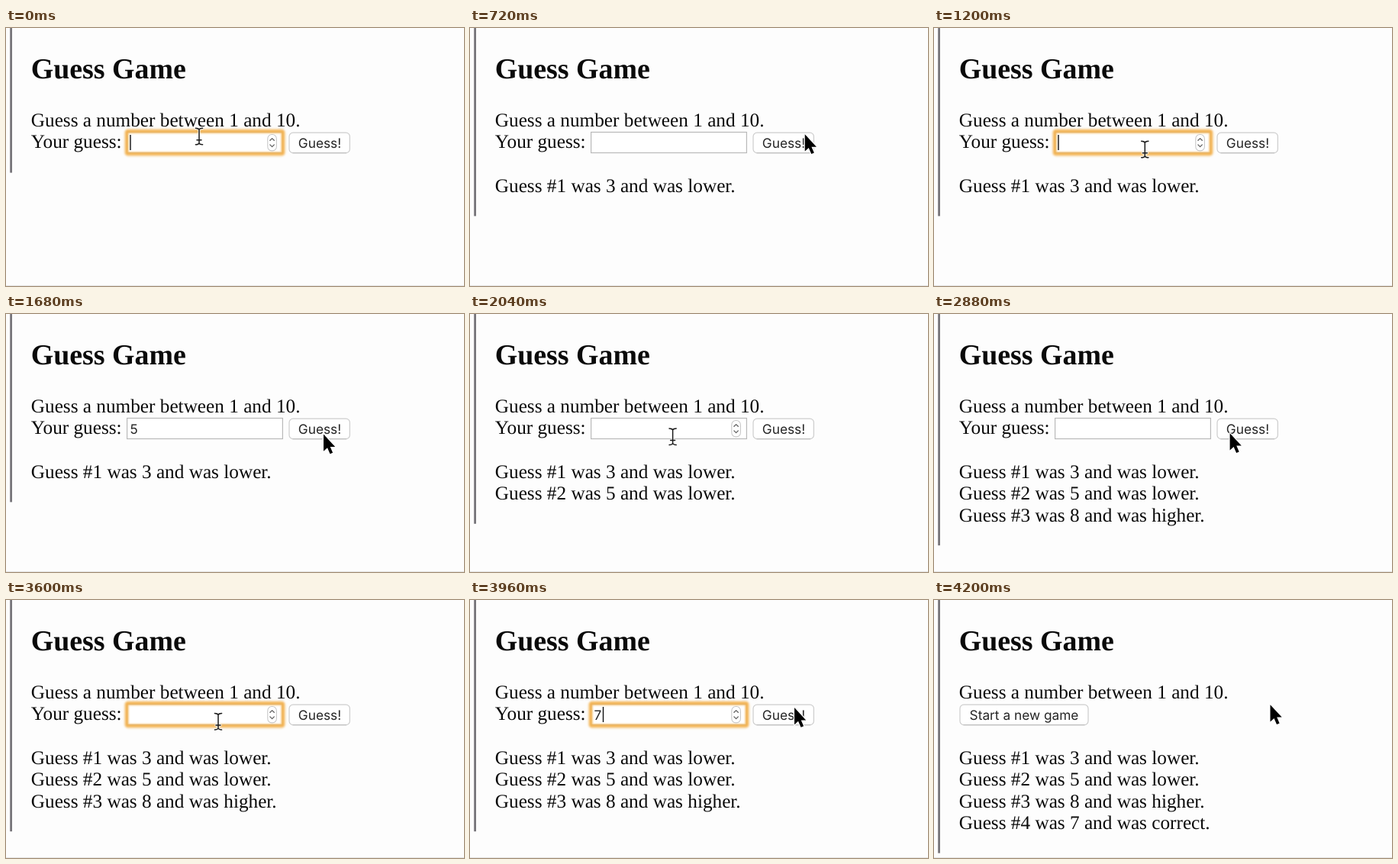
These frames come from a looping animation (600 px wide and 338 px high, 4.44 s). An HTML page:

```html
<!DOCTYPE html>
<html lang="en">
<head>
<meta charset="utf-8">
<title>Guess Game</title>
<style>
  html, body { margin: 0; width: 100%; height: 100%; overflow: hidden; background: #fdfdfd; }
  svg { display: block; width: 100vw; height: 100vh; }
  text { font: 25.25px "Liberation Serif", "Times New Roman", serif; fill: #0a0a0a; text-rendering: geometricPrecision; }
  .title { font-size: 37.9px; font-weight: bold; }
  .ui { font: 17.3px Inter, Roboto, sans-serif; fill: #262626; }
  .mid { text-anchor: middle; }
  .button rect { fill: #fff; stroke: #cdcdcd; stroke-width: 1.2; }
  .button path { fill: none; stroke: #bababa; stroke-width: 1.1; }
  .line { fill: none; stroke-linecap: round; stroke-linejoin: round; }
</style>
</head>
<body>
<svg viewBox="0 0 600 338" preserveAspectRatio="none">
  <defs>
    <filter id="soft" x="-5%" y="-25%" width="110%" height="150%"><feGaussianBlur stdDeviation="1"/></filter>
    <path id="beamShape" d="M-4.6 -10.8 Q-1 -10.8 0 -8.8 Q1 -10.8 4.6 -10.8 M0 -8.8 V8.8 M-4.6 10.8 Q-1 10.8 0 8.8 Q1 10.8 4.6 10.8 M-3 4.8 H3"/>
  </defs>
  <rect width="600" height="338" fill="#fdfdfd"/>
  <rect y="337" width="600" height="1" fill="#e6e6e6"/>
  <rect id="bar" x="5.2" width="2.8" fill="#77757a"/>

  <text class="title" x="32.7" y="65.6">Guess Game</text>
  <text x="32.8" y="128.6">Guess a number between 1 and 10.</text>

  <g id="form">
    <text x="32.8" y="157.1">Your guess:</text>
    <rect x="158.6" y="136.5" width="203.8" height="27" fill="#fff" stroke="#b9b9b9" stroke-width="1.2"/>
    <g id="ring" fill="none" stroke="#f3b353" filter="url(#soft)">
      <rect x="157.8" y="135" width="205.4" height="30.2" rx="2.5" stroke-width="6.5" opacity=".4"/>
      <rect x="158.2" y="135.4" width="204.6" height="29.4" rx="1.5" stroke-width="3.6"/>
    </g>
    <text class="ui" id="value" x="162.5" y="157.2"></text>
    <rect id="caret" y="140" width="1.4" height="20" fill="#111"/>
    <g id="spinner">
      <rect x="342.8" y="139.5" width="11.6" height="21.4" rx="5.5" fill="#fff" stroke="#c8c8c8" stroke-width="1.1"/>
      <path class="line" stroke="#606060" stroke-width="1.3" d="M345.9 147.3 L348.6 144.6 L351.3 147.3 M345.9 152.9 L348.6 155.6 L351.3 152.9"/>
    </g>
    <g class="button">
      <rect x="371" y="137.2" width="79.4" height="26.4" rx="5"/>
      <path d="M375.5 163.7 H446"/>
      <text class="ui mid" x="411" y="157.2">Guess!</text>
    </g>
  </g>

  <g id="restart" class="button">
    <rect x="34" y="137.2" width="168" height="26.4" rx="5"/>
    <path d="M38.5 163.7 H197.5"/>
    <text class="ui mid" x="118" y="157.2">Start a new game</text>
  </g>

  <g id="log"></g>

  <g id="beam" class="line">
    <use href="#beamShape" stroke="#fff" stroke-width="3.4" opacity=".8"/>
    <use href="#beamShape" stroke="#1a1a1a" stroke-width="1.5"/>
  </g>
  <path id="arrow" d="M0 0 V22.3 L5 17.7 L8.5 25.7 L12.1 24.2 L8.7 16.4 H15.2 Z"
    fill="#000" stroke="#fff" stroke-width="2.4" stroke-linejoin="round" paint-order="stroke"/>
</svg>
<script>
const LOOP = 4440;
const LINE = 28.4;
const $ = id => document.getElementById(id);

const guesses = [[3, 'lower'], [5, 'lower'], [8, 'higher'], [7, 'correct']];
const rows = guesses.map(([n, result], i) => {
  const row = document.createElementNS('http://www.w3.org/2000/svg', 'text');
  row.setAttribute('x', 32.8);
  row.setAttribute('y', 214.9 + i * LINE);
  row.textContent = `Guess #${i + 1} was ${n} and was ${result}.`;
  $('log').append(row);
  return row;
});

const beam = (x, y) => ({ pointer: 'beam', x, y });
const arrow = (x, y) => ({ pointer: 'arrow', x, y });
const focus = { focus: true, caret: true };
const blur = { focus: false, caret: false };
const type = value => ({ value, caret: true });
const submit = count => ({ value: '', count });

// Each step changes part of the state from its start time on.
const steps = [
  [0, beam(253, 142), focus, submit(0)],
  [120, beam(262, 146), type('3')],
  [240, beam(335, 152)],
  [360, arrow(418, 143)],
  [480, arrow(438.7, 139.3), blur],
  [720, submit(1)],
  [960, arrow(392, 144)],
  [1080, beam(292, 158)],
  [1200, beam(276.3, 159), focus],
  [1440, type('5')],
  [1560, beam(338, 159)],
  [1680, arrow(416, 157.5), blur],
  [1800, arrow(422.3, 157.5), submit(2)],
  [2040, beam(265.6, 160.7)],
  [2160, focus],
  [2400, type('8')],
  [2520, beam(318, 159)],
  [2640, arrow(381, 156)],
  [2760, arrow(387.6, 156.2), blur],
  [2880, submit(3)],
  [3120, beam(310, 160)],
  [3240, beam(278, 159.2)],
  [3360, focus],
  [3600, { caret: false }],
  [3720, type('7')],
  [3840, beam(340, 154)],
  [3960, arrow(425, 141)],
  [4080, arrow(440.5, 137.2), blur],
  [4200, submit(4)]
];

function stateAt(time) {
  const state = {};
  for (const [start, ...changes] of steps) {
    if (start > time) break;
    Object.assign(state, ...changes);
  }
  return state;
}

const show = (el, on) => el.setAttribute('visibility', on ? 'visible' : 'hidden');
const display = (el, on) => { el.style.display = on ? '' : 'none'; };

function draw(time) {
  const s = stateAt(time);
  const done = s.count === guesses.length;
  display($('form'), !done);
  display($('restart'), done);
  show($('ring'), s.focus);
  show($('caret'), s.caret);
  show($('spinner'), s.focus || s.pointer === 'beam');
  $('value').textContent = s.value;
  $('caret').setAttribute('x', s.value ? 173.8 : 162.3);
  $('bar').setAttribute('height', 189.6 + (s.count ? s.count + 1 : 0) * LINE);
  rows.forEach((row, i) => show(row, i < s.count));
  for (const name of ['beam', 'arrow']) {
    show($(name), s.pointer === name);
    $(name).setAttribute('transform', `translate(${s.x} ${s.y})`);
  }
}

function tick() {
  draw(performance.now() % LOOP);
  requestAnimationFrame(tick);
}
tick();
</script>
</body>
</html>
```
